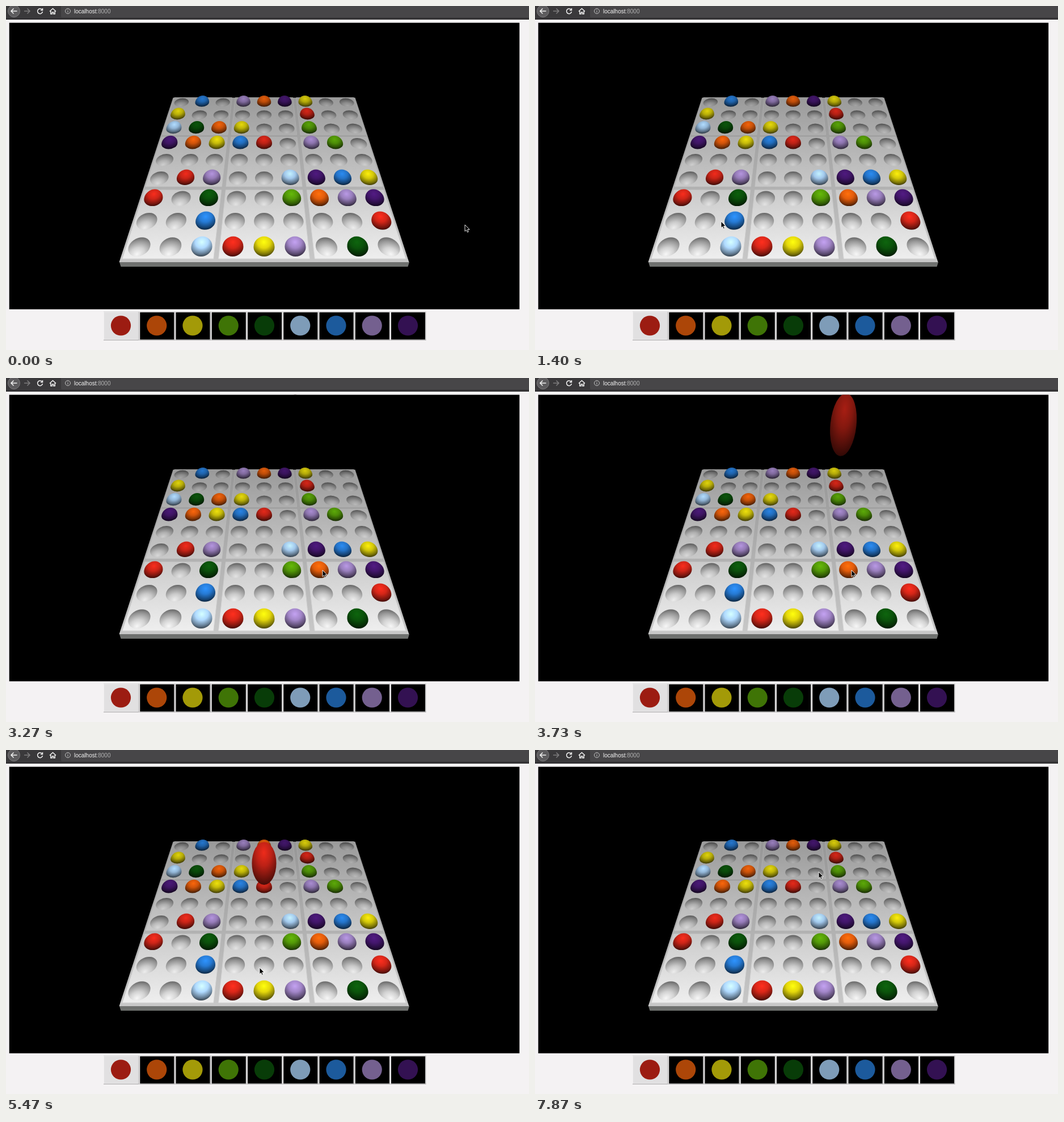
An HTML page that plays this animation: 922x607 px, repeating every 8 s.

```html
<!DOCTYPE html>
<html lang="en">
<head>
<meta charset="utf-8">
<title>Marble board</title>
<style>
html, body { margin: 0; width: 922px; height: 607px; overflow: hidden; background: #f4f2f3; }
svg { display: block; }
text { font: 10px "Liberation Sans", Arial, sans-serif; }
</style>
</head>
<body>
<svg id="stage" width="922" height="607" viewBox="0 0 922 607"></svg>
<script>
const LOOP = 8000, STEP = 200 / 3, MID = 455, HORIZON = -329;
// Each digit is a marble colour, a dot is an empty hole
const GRID = ('.7.8293.. 3.....1.. 6523..4.. 92371.84. ......... ' +
  '.18..6973 1.5..4289 ..7.....1 ..6138.5.').split(' ');
const COLORS = '9c1c12 ac4608 a39a08 3f7406 083c08 7e9cb8 1c5a9c 74608f 331152'.split(' ');

let defs = '';
const channels = hex => hex.match(/../g).map(v => parseInt(v, 16));
const shade = (hex, k) => `rgb(${channels(hex).map(v => Math.min(255, Math.round(v * k)))})`;
const gray = v => shade('010101', v);

// Perspective: c counts columns from the middle, r counts rows from the back
const size = r => 1 / (.01818 + .00116 * (8 - r));
const proj = (c, r) => { const s = size(r); return [MID + c * s, 13.71 * s + HORIZON]; };
const quad = (c0, r0, c1, r1, attrs) => {
  const pts = [[c0, r0], [c1, r0], [c1, r1], [c0, r1]].map(p => proj(...p).map(v => v.toFixed(1)).join());
  return `<polygon points="${pts.join(' ')}" ${attrs}/>`;
};

const stops = list => list.map(([o, c]) => `<stop offset="${o}" stop-color="${c}"/>`).join('');
const radial = (id, cy, r, list) => {
  defs += `<radialGradient id="${id}" cx=".49" cy="${cy}" r="${r}">${stops(list)}</radialGradient>`;
};
const depth = (id, far, near) => {
  defs += `<linearGradient id="${id}" gradientUnits="userSpaceOnUse" x1="0" x2="0" y1="162" y2="452">
    ${stops([[0, gray(far)], [1, gray(near)]])}</linearGradient>`;
};

function toolbar() {
  return `<rect width="922" height="24" fill="#3a393b"/>
    <rect x="97" y="-4" width="830" height="24" rx="2" fill="#474648"/>
    <rect y="22.5" width="922" height="1.5" fill="#29282a"/>
    <circle cx="14" cy="9" r="10.5" fill="#5d5c5e" stroke="#7b7a7c"/>
    <g fill="none" stroke="#f2f2f2" stroke-width="1.5">
      <path d="M19.5 9H9M13.5 4.5L9 9l4.5 4.5"/>
      <path d="M32 9h10M37.5 4.5L42 9l-4.5 4.5" stroke="#7d7c7e"/>
      <path d="M63.5 6.2A4.5 4.5 0 1 0 64.5 10M64.5 4v3.5H61"/>
      <path d="M77 9.5L82.5 4.5 88 9.5M78.8 9v5h2.5v-3h2.4v3h2.5V9"/>
    </g>
    <circle cx="109" cy="9" r="4.5" fill="none" stroke="#c4c4c4"/>
    <path d="M109 8.5v3M109 6.2v1.2" stroke="#c4c4c4"/>
    <text x="120" y="13" fill="#f4f4f4">localhost<tspan fill="#b2b2b2">:8000</tspan></text>`;
}

function board() {
  depth('base', 150, 200);
  depth('tile', 154, 240);
  depth('edge', 166, 220);
  let out = '<path d="M200 452H711L708.5 460H202.5Z" fill="#6f716f"/>'
    + quad(-4.485, -.41, 4.485, 8.54, 'fill="url(#base)"');
  for (let c = -4.5; c < 4; c += 3) for (let r = -.5; r < 8; r += 3) {
    out += quad(c + .08, r + .09, c + 2.92, r + 2.92, 'fill="url(#tile)" stroke="url(#edge)"');
  }
  return out;
}

function cell(r, c, kind) {
  const s = size(r), [x, y] = proj(c - 4, r), ry = .0056 * s * s, skew = (x - MID) / (y - HORIZON);
  const place = k => `transform="matrix(1 0 ${skew * k} 1 ${x} ${y})"`;
  if (!kind) return `<ellipse rx="${.345 * s}" ry="${ry}" fill="url(#hole${r})" ${place(1)}/>`;
  const id = `m${r}${c}`, k = 1.15 + .04 * r, R = .337 * s, tone = v => shade(COLORS[kind - 1], v * k);
  radial(id, .28, .72, [[0, tone(1.15)], [.42, tone(.95)], [.78, tone(.58)], [1, tone(.3)]]);
  return `<path d="M${-R} 0A${R} ${R} 0 0 1 ${R} 0A${R} ${ry} 0 0 1 ${-R} 0Z" fill="url(#${id})" ${place(.5)}/>`;
}

function cells() {
  return GRID.map((row, r) => {
    const L = 160 + 10 * r;
    radial('hole' + r, .88, .86, [[0, gray(L * 1.03)], [.4, gray(L * .88)], [.8, gray(L * .62)], [1, gray(L * .45)]]);
    return [...row].map((kind, c) => cell(r, c, +kind || 0)).join('');
  }).join('');
}

function palette() {
  return COLORS.map((color, i) => {
    const x = 172 + 63.25 * i;
    return `<rect x="${x}" y="539.5" width="62.5" height="50.5" fill="#a9a8a9"/>
      <rect x="${x}" y="539.5" width="61.5" height="49.5" fill="#f0eff0"/>
      <rect x="${x + 1}" y="540.5" width="60" height="48" fill="${i ? '#000' : '#e1e0e1'}"/>
      <circle cx="${x + 30.5}" cy="564" r="17.6" fill="#${color}"/>`;
  }).join('');
}

const canvas = '<rect x="5.7" y="29.6" width="899.5" height="505.6"/>';
const art = toolbar() + canvas + board() + cells() + palette();
radial('fall', .25, .78, [[0], [.4], [1]]);
const stage = document.getElementById('stage');
stage.innerHTML = `<defs>${defs}<clipPath id="view">${canvas}</clipPath></defs>${art}
  <g clip-path="url(#view)"><ellipse id="ball" fill="url(#fall)"/></g>
  <path id="cursor" d="M0 0V11.5L2.6 9.2L4.4 13.2L6.3 12.4L4.6 8.4H8.2Z" fill="#000" stroke="#fff" stroke-width=".9"/>`;
const ball = document.getElementById('ball'), cursor = document.getElementById('cursor');
const fallStops = document.querySelectorAll('#fall stop');

// Bounces: moment of contact, column, row
const DROPS = [[1095, 4, 7], [2308, 2, 6], [3534, 6, 6], [5293, 4, 7]];
// Pointer moves: start, end, x, y
const MOVES = [[70, 670, 448, 384], [1170, 1400, 328, 380], [1670, 1800, 361, 335], [2560, 2870, 558, 339],
  [4000, 4270, 640, 350], [4270, 4800, 447, 384], [6070, 6530, 537, 264], [7070, 7330, 573, 182], [7330, 7730, 500, 215]];

function pointerAt(t) {
  let x = 809, y = 386;
  for (const [from, to, nx, ny] of MOVES) {
    const u = Math.min(1, Math.max(0, (t - from) / (to - from))), e = u * u * (3 - 2 * u);
    x += (nx - x) * e;
    y += (ny - y) * e;
  }
  return [x, y];
}

function drawBall(t) {
  const [time, c, r] = DROPS.find(d => t < d[0] + 310) || DROPS[0];
  const dt = Math.abs(t - time), s = size(r), [x0, y0] = proj(c - 4, r);
  const floor = y0 + (GRID[r][c] === '.' ? .24 : -.3) * s;
  const low = floor - .732 * dt - 5.2e-6 * dt ** 3;
  ball.style.display = low > 30 ? '' : 'none';
  if (low <= 30) return;
  // The ball swells and stretches as it nears the camera
  const h = 23870 / (low + 77), w = 49.8 - .028 * low;
  const x = x0 + (MID - x0) * 1.4e-8 * (floor - low) ** 3;
  ball.setAttribute('rx', w / 2);
  ball.setAttribute('ry', h / 2);
  ball.setAttribute('transform', `translate(${x} ${low - h / 2}) rotate(${(x - MID) * .066})`);
  const light = .34 + .0035 * low;
  [1.3, 1.02, .34].forEach((k, i) => fallStops[i].setAttribute('stop-color', shade(COLORS[0], k * light)));
}

function draw(now) {
  const t = Math.floor((now % LOOP + 4.5) / STEP) * STEP % LOOP;
  drawBall(t);
  cursor.setAttribute('transform', `translate(${pointerAt(t)})`);
}

const start = performance.now();
function tick() {
  draw(performance.now() - start);
  requestAnimationFrame(tick);
}
tick();
</script>
</body>
</html>
```
